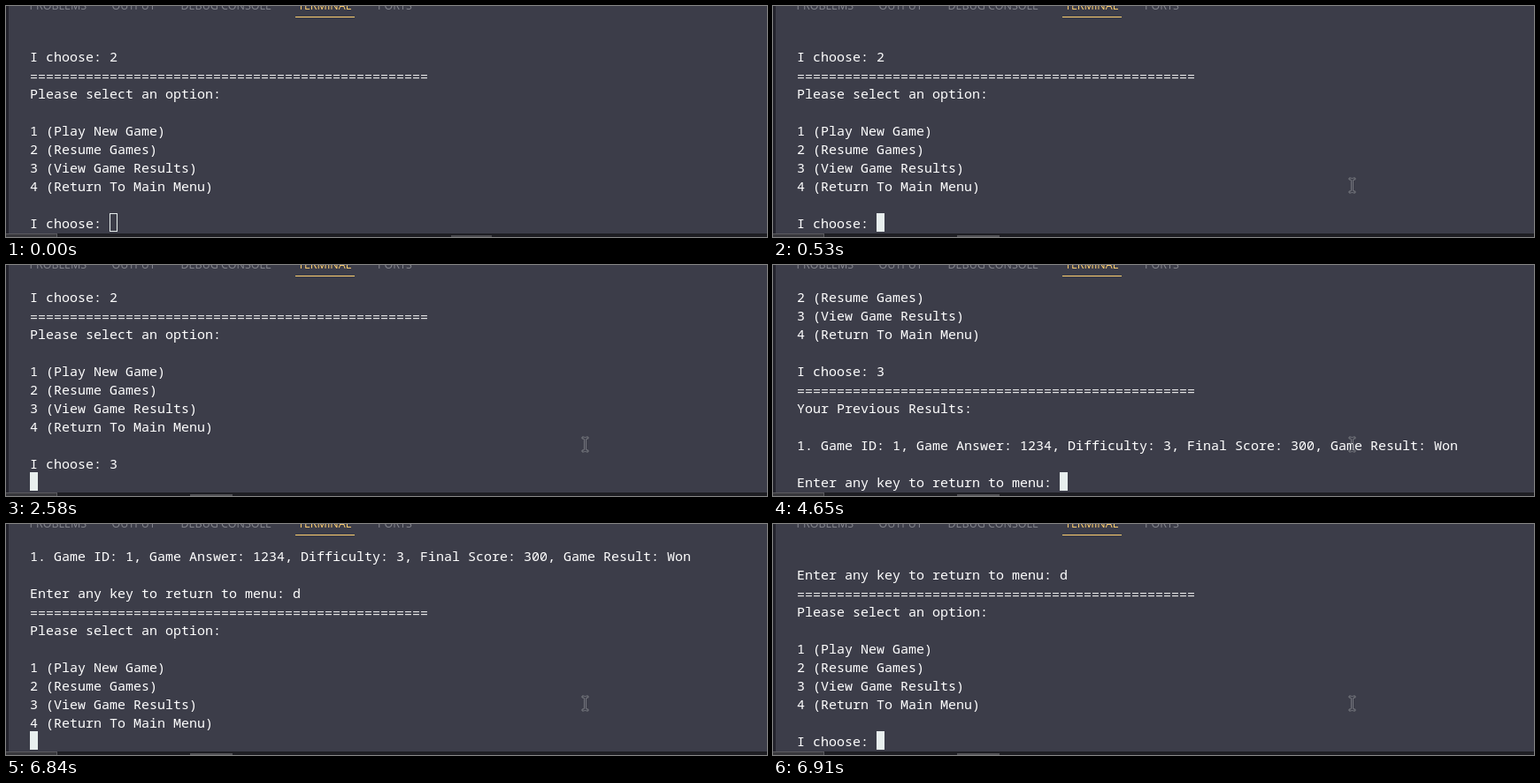
Recreate the animation shown at these times as an HTML page. Size 860 by 262 pixels, loop 8 s.

```html
<!DOCTYPE html>
<html lang="en">
<head>
<meta charset="utf-8">
<title>Terminal menu</title>
<style>
  html, body { margin: 0; width: 100%; height: 100%; overflow: hidden; background: #3c3d49; }
  svg { display: block; width: 860px; height: 262px; }
  .tabs { font: 12.5px "Open Sans", "Noto Sans", sans-serif; fill: #85868e; }
  .tabs .active { fill: #ffcf70; }
  .screen { font: 500 15px "Noto Sans Mono", "DejaVu Sans Mono", monospace; fill: #fff; }
  .screen text { white-space: pre; }
  .screen .rule { font-weight: 400; fill: #e6e6e6; transform: translateY(1px); }
</style>
</head>
<body>
<svg viewBox="0 0 860 262">
  <rect width="860" height="262" fill="#3c3d49"/>
  <rect width="3" height="262" fill="#23232c"/>
  <g class="tabs">
    <text x="26.5" y="4">PROBLEMS</text>
    <text x="119.5" y="4">OUTPUT</text>
    <text x="197.5" y="4">DEBUG CONSOLE</text>
    <text x="330" y="4" class="active">TERMINAL</text>
    <text x="420" y="4">PORTS</text>
  </g>
  <rect x="327" y="12" width="67" height="1" fill="#ffcf70"/>
  <g class="screen" id="screen"></g>
  <rect id="cursor" width="9" height="21"/>
  <rect y="258" width="860" height="4" fill="#1e1e23"/>
  <rect y="258" width="58" height="4" fill="#5c5c60"/>
  <rect y="259" width="57" height="3" fill="#37373b"/>
  <rect id="task" y="260" height="2"/>
  <path id="pointer" fill="none" stroke="#85868c" stroke-width=".8" d="M-3.5-8.5h2.5l1 1 1-1h2.5v2h-2l-.5 1v11l.5 1h2v2h-2.5l-1-1-1 1h-2.5v-2h2l.5-1v-11l-.5-1h-2z"/>
</svg>
<script>
const LOOP = 8000, LEFT = 27, CELL = 9, LINE = 21, ROWS = 11, BOTTOM = 235;
const rule = "=".repeat(50);
const menu = [
  rule, "Please select an option:", "",
  "1 (Play New Game)", "2 (Resume Games)", "3 (View Game Results)", "4 (Return To Main Menu)"
];
const transcript = [
  "", "I choose: 2", ...menu, "", "I choose: 3",
  rule, "Your Previous Results:", "",
  "1. Game ID: 1, Game Answer: 1234, Difficulty: 3, Final Score: 300, Game Result: Won",
  "", "Enter any key to return to menu: d", ...menu, "", "I choose: "
];

// time, last visible line, cursor column
const typing = [
  [0, 10, 10], [1720, 10, 11], [2580, 11, 0],
  [4650, 16, 33], [6180, 16, 34], [6840, 24, 0], [6910, 25, 10]
];
// time, x, y
const moves = [[0, -50, -50], [70, 640, 245], [165, 673, 214], [260, 654.5, 203.5]];
// time, x, width, colour
const tasks = [[0, 503, 46, "#4b4b4f"], [70, 503, 46, "#434347"], [530, 208, 48, "#535357"]];
const FOCUS = 460;

const $ = id => document.getElementById(id);
const set = (el, attrs) => Object.entries(attrs).forEach(([k, v]) => el.setAttribute(k, v));
const stepAt = (steps, t) => steps.findLast(step => step[0] <= t);

const rows = Array.from({ length: ROWS }, (_, i) => {
  const row = document.createElementNS("http://www.w3.org/2000/svg", "text");
  set(row, { x: LEFT, y: BOTTOM + 17 - (ROWS - 1 - i) * LINE });
  return $("screen").appendChild(row);
});

function draw(t) {
  const [, last, column] = stepAt(typing, t);
  rows.forEach((row, i) => {
    const index = last - ROWS + 1 + i;
    const text = index === last ? transcript[index].slice(0, column) : transcript[index];
    if (row.textContent === text) return;
    row.textContent = text;
    row.classList.toggle("rule", text === rule);
  });

  const x = LEFT + column * CELL;
  set($("cursor"), t < FOCUS
    ? { x: x + .5, y: BOTTOM + .5, width: CELL - 1, height: LINE - 1, fill: "none", stroke: "#e8efee" }
    : { x, y: BOTTOM, width: CELL, height: LINE, fill: "#e8efee", stroke: "none" });

  const [, px, py] = stepAt(moves, t);
  set($("pointer"), { transform: `translate(${px} ${py})` });

  const [, tx, width, fill] = stepAt(tasks, t);
  set($("task"), { x: tx, width, fill });
}

const start = performance.now();
function tick() {
  draw((performance.now() - start) % LOOP);
  requestAnimationFrame(tick);
}
tick();
</script>
</body>
</html>
```
